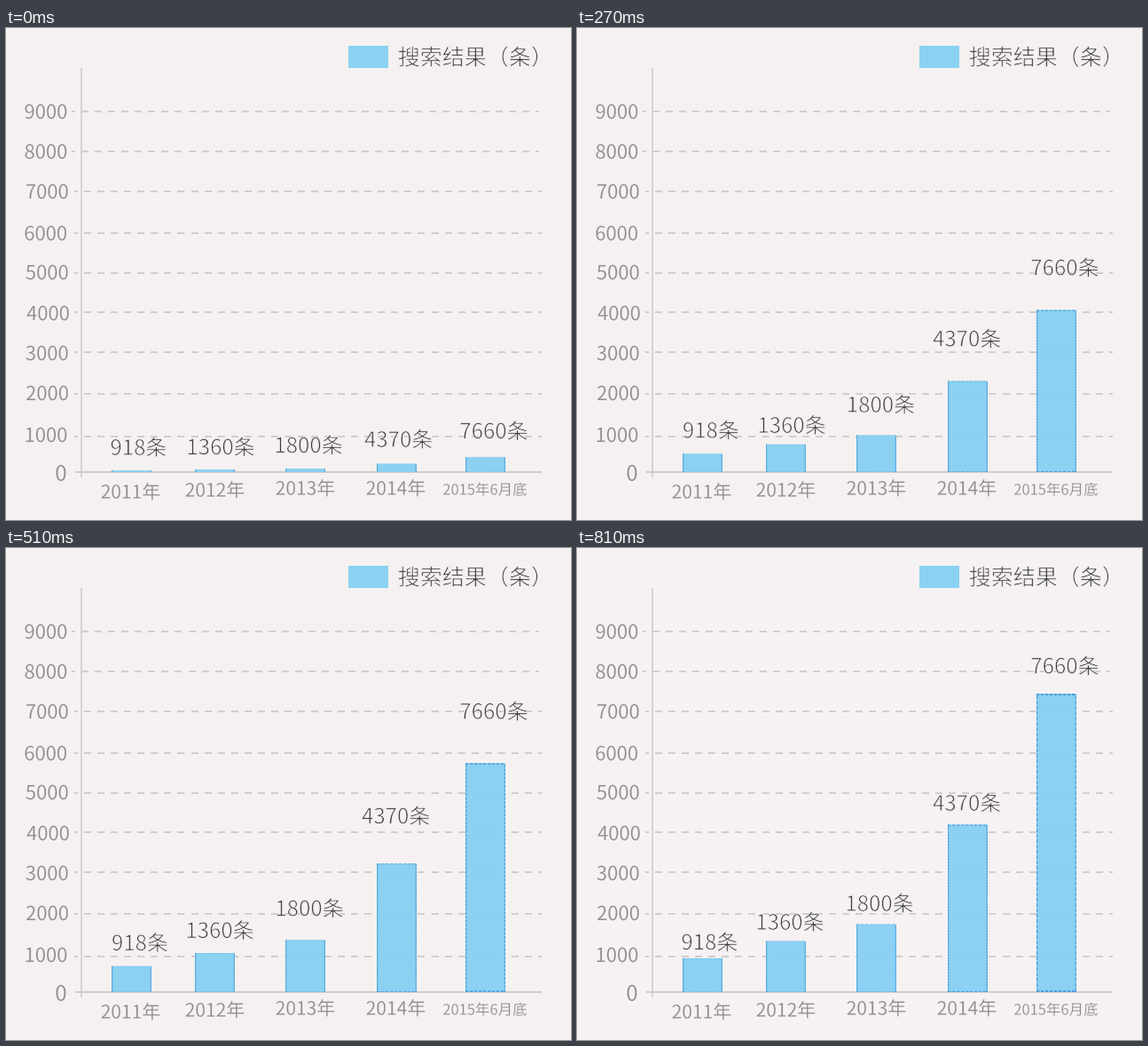
These frames come from a looping animation (637 by 554 pixels, 3940 ms). A matplotlib script:

```python
import numpy as np
import matplotlib.pyplot as plt
from matplotlib.animation import FuncAnimation
from matplotlib.patches import PathPatch, Rectangle
from matplotlib.path import Path
from matplotlib.textpath import TextPath
from matplotlib.transforms import Affine2D

W, H, DPI = 637, 554, 100
LOOP, TICK, STEP = 3940, 10, 30
PX = 72 / DPI
BASE = 500
BG, BG_END = "#f5f1f0", "#f6f2f3"
SKY, EDGE = "#8ad1f3", "#4a9fd8"
RULE, GREY, DARK = "#cccaca", "#8f8b8a", "#404040"

fig = plt.figure(figsize=(W / DPI, H / DPI), dpi=DPI, facecolor=BG)
ax = fig.add_axes([0, 0, 1, 1])
ax.set(xlim=(0, W), ylim=(H, 0))
ax.axis("off")


class Label:
    """Text outline placed by its left ink edge and vertical middle."""

    def __init__(self, text, x, y, size, color, thin=0.0, z=5):
        path = TextPath((0, 0), text, size=size,
                        prop={"family": "Noto Sans CJK JP"})
        self.left = path.get_extents().x0
        self.drop = 0.367 * size
        self.patch = PathPatch(path, fc=color, ec=BG if thin else "none",
                               lw=thin * PX, zorder=z)
        ax.add_patch(self.patch)
        self.move(x, y)

    def move(self, x, y):
        place = Affine2D().scale(1, -1).translate(x - self.left, y + self.drop)
        self.patch.set_transform(place + ax.transData)


def line(xs, ys, width, z=1, **kw):
    ax.plot(xs, ys, color=RULE, lw=width * PX, zorder=z,
            solid_capstyle="butt", dash_capstyle="butt", **kw)


def dashed_rule(x0, x1, y):
    # half a dash at each end, whole dashes between
    n = round((x1 - x0) / 15)
    pitch = (x1 - x0) / n
    on = 8
    for i in range(n + 1):
        mid = x0 + i * pitch
        line([max(x0, mid - on / 2), min(x1, mid + on / 2)], [y, y], 1.8)


def box(x, y, w, h):
    return Path([(x, y), (x + w, y), (x + w, y + h), (x, y + h), (x, y)],
                closed=True)


def dashed_border(w, h, tx, ty):
    """Dashed frame of a w by h box, with side and cap thickness tx, ty."""
    parts = []
    for y in np.arange(0, h, 6):
        parts += [box(0, y, tx, 4.2), box(w - tx, y, tx, 4.2)]
    for x in np.arange(0, w, 5):
        parts += [box(x, 0, 3.4, ty), box(x, h - ty, 3.4, ty)]
    return Path.make_compound_path(*parts)


FULL = 336
BORDER = dashed_border(45, FULL, 1.3, 2)

# motion knots, counted in 30 ms steps
KNOTS = (0, 1, 12, 17, 27)
GROW = (0.05, 0.143, 0.693, 0.767, 1)


class Bar:
    def __init__(self, x, height, text, xs, ys):
        self.x, self.height, self.xs, self.ys = x, height, xs, ys
        self.fill = Rectangle((x, BASE), 45, 0, fc=SKY, ec="none",
                              alpha=0.98, zorder=3, snap=False)
        self.border = PathPatch(BORDER, fc=EDGE, ec="none", zorder=4,
                                snap=False)
        ax.add_patch(self.fill)
        ax.add_patch(self.border)
        self.label = Label(text, xs[0], ys[0], 24, DARK, thin=0.75, z=6)

    def update(self, k):
        h = self.height * np.interp(k, KNOTS, GROW)
        self.fill.set_y(BASE - h)
        self.fill.set_height(h)
        place = Affine2D().scale(1, -h / FULL).translate(self.x, BASE)
        self.border.set_transform(place + ax.transData)
        self.label.move(np.interp(k, KNOTS, self.xs),
                        np.interp(k, KNOTS, self.ys))


# scale and grid
rows = [(9000, 21.5, 94, 94), (8000, 21.5, 139, 139), (7000, 23, 184, 184),
        (6000, 21.5, 231, 231), (5000, 22.5, 275, 276), (4000, 23.5, 321, 320),
        (3000, 22.5, 366, 365), (2000, 23, 411, 412), (1000, 22.5, 458, 460)]
for value, x, y, rule_y in rows:
    Label(str(value), x, y, 22, GREY, thin=0.2)
    x0 = 74 if value > 7000 else 77
    dashed_rule(x0, x0 + 527, rule_y)
Label("0", 56.5, 501, 24, GREY, thin=0.2)
line([84.7, 84.7], [45, 506], 1.5)
line([78, 604], [BASE, BASE], 1.8, z=2)

# years
years = [("2011年", 107.5, 522, 21), ("2012年", 202.5, 520, 21),
         ("2013年", 304.5, 518, 21), ("2014年", 406.5, 518, 21),
         ("2015年6月底", 493, 519.5, 16.5)]
for text, x, y, size in years:
    Label(text, x, y, size, GREY, thin=0.2)

# legend
ax.add_patch(Rectangle((386, 20), 45, 25, fc=SKY, ec="none"))
Label("搜索结果（条）", 442.5, 32.5, 25, DARK, thin=0.75)

bars = [
    Bar(119, 38, "918条", (118.5, 118.5, 120.5, 120, 118.5),
        (472, 469.2, 446.7, 444.3, 443.5)),
    Bar(213, 57.3, "1360条", (205.5, 205.5, 205.5, 204.5, 203.5),
        (471.5, 469.4, 438.7, 430.3, 421)),
    Bar(315, 76.3, "1800条", (304.5, 304.5, 306.5, 305.5, 304.5),
        (469.5, 465, 408.5, 405.5, 400)),
    Bar(418, 188.5, "4370条", (404.5, 401.5, 401.5, 401.5, 401.5),
        (463, 459.2, 308.6, 301.5, 287)),
    Bar(518, FULL, "7660条", (512.5,) * 5,
        (453.5, 429.9, 209.5, 183.7, 132.5)),
]


def update(i):
    k = min(i * TICK // STEP, KNOTS[-1])
    fig.set_facecolor(BG_END if k == KNOTS[-1] else BG)
    for bar in bars:
        bar.update(k)
    return []


anim = FuncAnimation(fig, update, frames=LOOP // TICK, interval=TICK,
                     repeat=True, repeat_delay=0, blit=False)
plt.show()
```
